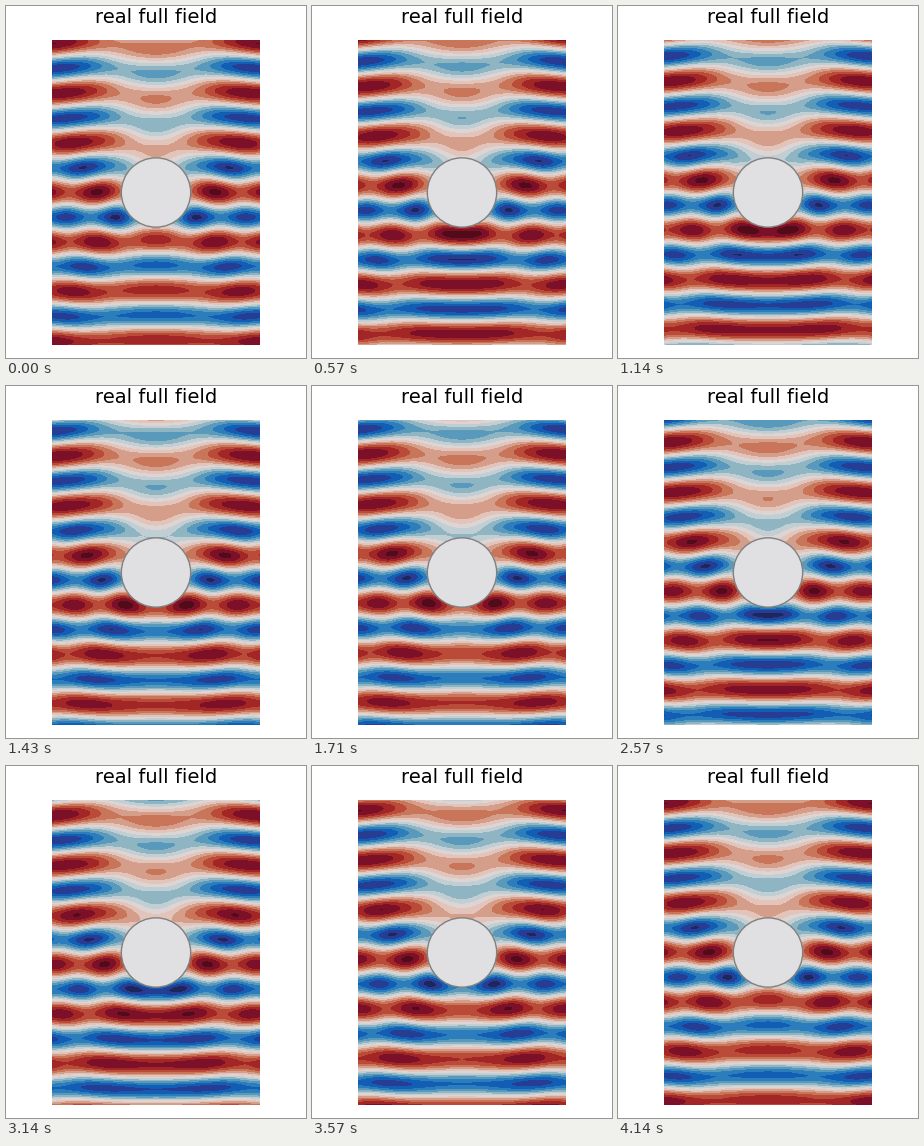
These frames come from a looping animation (300x352 px, 4280 ms). A matplotlib script:

```python
import numpy as np
import matplotlib.pyplot as plt
from matplotlib.animation import FuncAnimation
from matplotlib.colors import LinearSegmentedColormap
from matplotlib.patches import Circle

W, H, DPI = 300, 352, 100
LOOP_MS, STEPS = 4280, 30

K = 4.4                  # wavenumber, with the drawn radius as unit length
CORE = 0.88              # effective scattering radius
INDEX = 1.1 + 0.22j      # lossy refractive index of the core
DENSITY = 2.2            # host density over core density
ORDERS = 11
PEAK = 1.4

BALANCE = LinearSegmentedColormap.from_list("balance", [
    "#171c42", "#293a8f", "#0b66bd", "#4590b9", "#8eb5c2", "#d2d8db",
    "#e6d2cc", "#d59d89", "#c46548", "#ac2b24", "#780e28", "#3c0911"])


def bessel_j(n, z):
    t = np.linspace(0, 2 * np.pi, 256, endpoint=False)
    z = np.asarray(z)[..., None]
    return np.exp(1j * (z * np.sin(t) - n * t)).mean(axis=-1)


def bessel_y(n, x):
    """Integral form, used for orders 0 and 1 only."""
    x = np.asarray(x)[..., None]
    t = np.linspace(0, np.pi, 1500)
    s = np.linspace(0, 4, 1500)
    wave = np.trapezoid if hasattr(np, "trapezoid") else np.trapz
    tail = (np.exp(n * s) + (-1) ** n * np.exp(-n * s)) * np.exp(-x * np.sinh(s))
    return (wave(np.sin(x * np.sin(t) - n * t), t) - wave(tail, s)) / np.pi


def j_orders(z):
    return [bessel_j(n, z) for n in range(ORDERS + 2)]


def h_orders(x):
    y = [bessel_y(0, x), bessel_y(1, x)]
    for n in range(1, ORDERS + 1):
        y.append(2 * n / x * y[n] - y[n - 1])
    return [a.real + 1j * b for a, b in zip(j_orders(x), y)]


def slope(f, n):
    return -f[1] if n == 0 else (f[n - 1] - f[n + 1]) / 2


def full_field(x, y):
    """Plane wave travelling up plus the wave scattered by the core."""
    r, angle = np.maximum(np.hypot(x, y), 0.93), np.arctan2(x, y)
    edge = np.array(K * CORE)
    j, h, inner = j_orders(edge), h_orders(edge), j_orders(INDEX * edge)
    table = np.linspace(0.92, 5.4, 700)
    outer = h_orders(K * table)
    q = DENSITY * INDEX
    u = np.exp(1j * K * y)
    for n in range(ORDERS + 1):
        ji, dji = inner[n], q * slope(inner, n)
        amp = -(slope(j, n) * ji - j[n] * dji) / (slope(h, n) * ji - h[n] * dji)
        weight = (1 if n == 0 else 2) * 1j ** n * amp
        u = u + weight * np.interp(r, table, outer[n]) * np.cos(n * angle)
    return u


gx, gy = np.meshgrid(np.linspace(-3, 3, 121), np.linspace(-4.4, 4.4, 177))
field = full_field(gx, gy)
levels = np.linspace(-PEAK, PEAK, 16)

fig = plt.figure(figsize=(W / DPI, H / DPI), dpi=DPI, facecolor="white")
ax = fig.add_axes([46 / W, 13 / H, 208 / W, 305 / H])
ax.set_xlim(-3, 3)
ax.set_ylim(-4.4, 4.4)
ax.axis("off")
ax.add_patch(Circle((0, 0), 1, facecolor="#e0e0e2", edgecolor="#808080",
                    linewidth=1, zorder=3))
fig.text(0.5, 1 - 17 / H, "real full field", fontsize=14, color="black",
         family="DejaVu Sans", ha="center", va="baseline")

shown = []


def update(i):
    while shown:
        shown.pop().remove()
    phase = 2 * np.pi * i / (STEPS - 1)   # last step closes the cycle
    shown.append(ax.contourf(gx, gy, (field * np.exp(-1j * phase)).real,
                             levels=levels, cmap=BALANCE, extend="both",
                             vmin=-PEAK, vmax=PEAK, zorder=1))
    return shown


anim = FuncAnimation(fig, update, frames=STEPS, interval=LOOP_MS / STEPS,
                     repeat=True, repeat_delay=0, blit=False)
plt.show()
```
